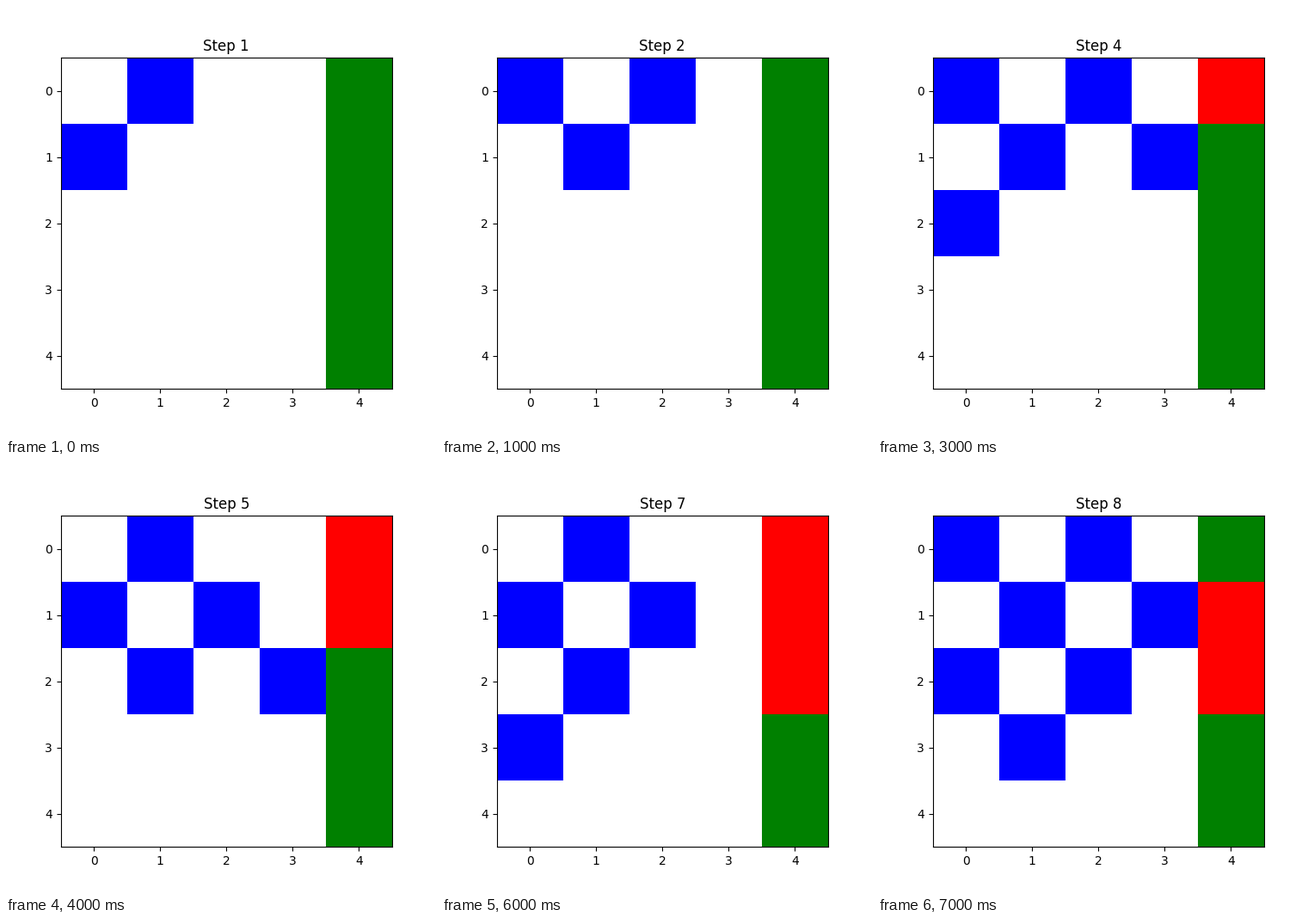
A matplotlib script for the animation above (8 s loop, 500x500 px).

```python
import numpy as np
import matplotlib.pyplot as plt
from matplotlib.animation import FuncAnimation
from matplotlib.colors import ListedColormap

SIZE = 5
STEPS = 8
EXIT = SIZE - 1      # column of the exits
USED_EXITS = 3       # exits taken one after another by the first group
BUSY_STEPS = 4       # how long a taken exit stays closed
FREE, WALKER, OPEN, CLOSED = range(4)
CMAP = ListedColormap(["white", "blue", "green", "red"])


def is_closed(row, step):
    taken = EXIT + row
    return row < USED_EXITS and taken <= step < taken + BUSY_STEPS


def walker_columns(row, step):
    """Walkers enter a row every second step and move right one cell a step."""
    first_entry = max(0, 3 * row - 2)
    way_out = not all(is_closed(r, step) for r in range(row + 1))
    end = EXIT if way_out else EXIT - 1
    return [col for col in range(end)
            if step - col >= first_entry and (step - col - first_entry) % 2 == 0]


def grid_at(step):
    grid = np.full((SIZE, SIZE), FREE)
    for row in range(SIZE):
        grid[row, EXIT] = CLOSED if is_closed(row, step) else OPEN
        grid[row, walker_columns(row, step)] = WALKER
    # The first group walks down beside the exits
    group_row = step - (EXIT - 1)
    if 0 <= group_row < USED_EXITS:
        grid[group_row, EXIT - 1] = WALKER
    return grid


fig, ax = plt.subplots(figsize=(5, 5), dpi=100)
image = ax.imshow(grid_at(1), cmap=CMAP, vmin=FREE, vmax=CLOSED)
title = ax.set_title("Step 1")


def update(frame):
    step = frame + 1
    image.set_data(grid_at(step))
    title.set_text(f"Step {step}")
    return image, title


anim = FuncAnimation(fig, update, frames=STEPS, interval=1000, repeat=True,
                     repeat_delay=0, blit=False)
plt.show()
```
